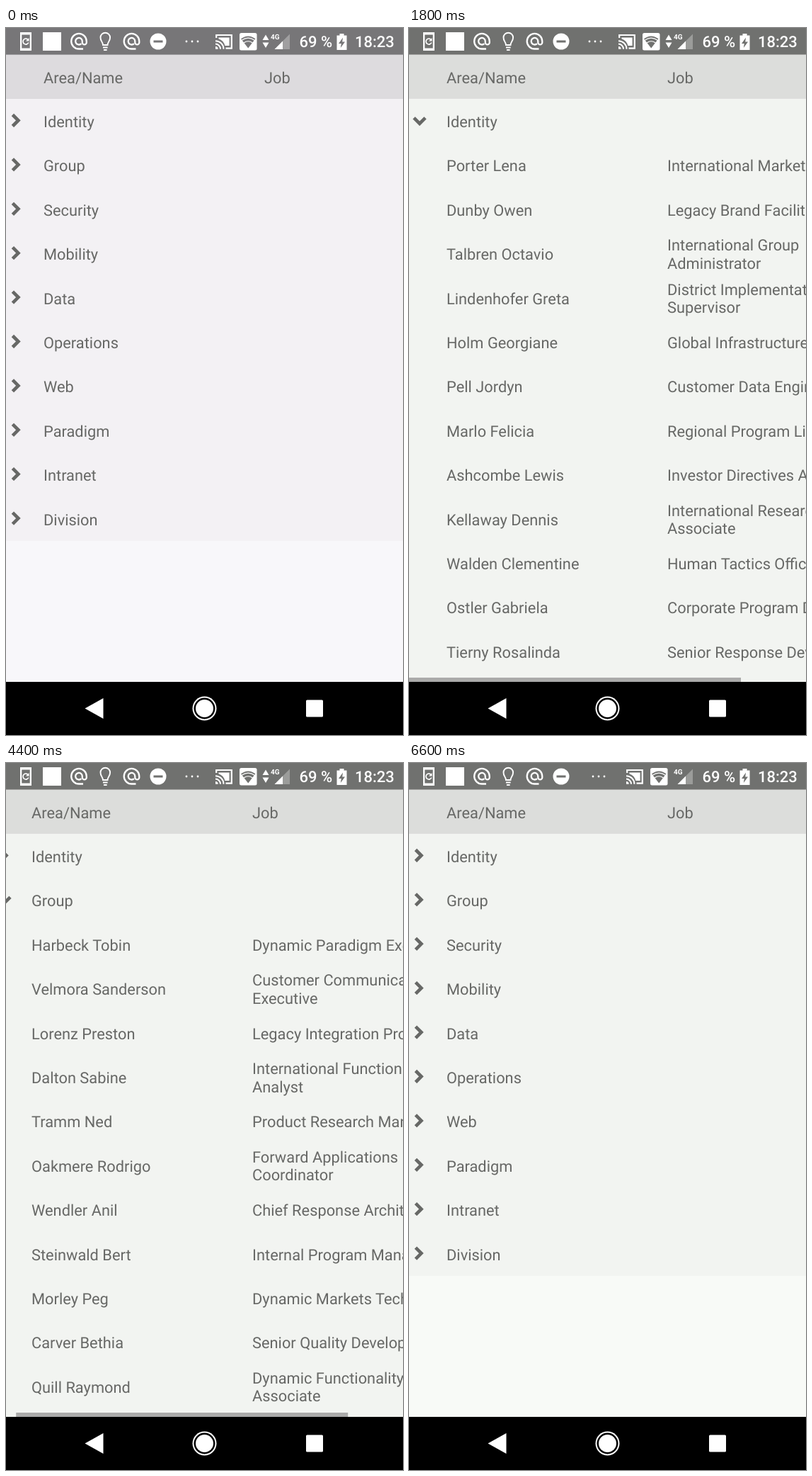
These frames come from a looping animation (561x998 px, 7300 ms). An HTML page with a canvas:

```html
<!DOCTYPE html>
<html lang="en">
<head>
<meta charset="utf-8">
<title>Grouped table</title>
<style>
html, body { margin: 0; width: 100%; height: 100%; overflow: hidden; background: #000; }
canvas { display: block; }
</style>
</head>
<body>
<canvas id="stage" width="561" height="998"></canvas>
<script>
const ctx = document.getElementById('stage').getContext('2d');
const LOOP = 7300, W = 561, ROW = 62.4, HEAD = 37.4, TOP = HEAD + ROW, BOTTOM = 923;
const FULL = 812.5, THUMB = 469, CONTENT = 671;
const INK = '#676866';

const areas = ['Identity', 'Group', 'Security', 'Mobility', 'Data', 'Operations',
  'Web', 'Paradigm', 'Intranet', 'Division'];

const people = [
  [
    ['Porter Lena', 'International Markets Agent'],
    ['Dunby Owen', 'Legacy Brand Facilitator'],
    ['Talbren Octavio', 'International Group|Administrator'],
    ['Lindenhofer Greta', 'District Implementation|Supervisor'],
    ['Holm Georgiane', 'Global Infrastructure Agent'],
    ['Pell Jordyn', 'Customer Data Engineer'],
    ['Marlo Felicia', 'Regional Program Liaison'],
    ['Ashcombe Lewis', 'Investor Directives Analyst'],
    ['Kellaway Dennis', 'International Research|Associate'],
    ['Walden Clementine', 'Human Tactics Officer'],
    ['Ostler Gabriela', 'Corporate Program Designer'],
    ['Tierny Rosalinda', 'Senior Response Developer']
  ],
  [
    ['Harbeck Tobin', 'Dynamic Paradigm Executive'],
    ['Velmora Sanderson', 'Customer Communications|Executive'],
    ['Lorenz Preston', 'Legacy Integration Producer'],
    ['Dalton Sabine', 'International Functionality|Analyst'],
    ['Tramm Ned', 'Product Research Manager'],
    ['Oakmere Rodrigo', 'Forward Applications|Coordinator'],
    ['Wendler Anil', 'Chief Response Architect'],
    ['Steinwald Bert', 'Internal Program Manager'],
    ['Morley Peg', 'Dynamic Markets Technician'],
    ['Carver Bethia', 'Senior Quality Developer'],
    ['Quill Raymond', 'Dynamic Functionality|Associate']
  ]
];

// Each toggle: when its row is tapped open, tapped closed, and when its scrollbar shows.
const toggles = [{ open: 500, close: 2400, bar: 1300 }, { open: 3600, close: 5700, bar: 4400 }];

const scrollKeys = [[1200, 0], [1300, 25], [1400, 85], [1500, 110], [1600, 110], [1700, 50], [1800, 0],
  [4300, 0], [4400, 17], [4500, 75], [4600, 110], [4700, 110], [4800, 100], [4900, 61], [5000, 18], [5100, 0]];

const swing = p => 0.5 - Math.cos(Math.PI * Math.min(1, Math.max(0, p))) / 2;

function scrollAt(t) {
  const i = scrollKeys.findIndex(k => k[0] >= t);
  if (i < 1) return 0;
  const [t0, a] = scrollKeys[i - 1], [t1, b] = scrollKeys[i];
  return a + (b - a) * (t - t0) / (t1 - t0);
}

const openness = (g, t) => swing((t - g.open) / 600) - swing((t - g.close - 100) / 600);
const pressed = (g, t) => t >= g.open && t < g.open + 600 || t >= g.close && t < g.close + 700;

function rect(color, x, y, w, h) {
  ctx.fillStyle = color;
  ctx.fillRect(x, y, w, h);
}

function label(str, x, y, color = INK, font = '21.84px') {
  ctx.fillStyle = color;
  ctx.font = font + ' Roboto, sans-serif';
  ctx.textRendering = 'geometricPrecision';
  ctx.fillText(str, x, y);
}

function fill(path, color = '#fff') {
  ctx.fillStyle = color;
  ctx.fill(new Path2D(path), 'evenodd');
}

function line(path, width, color = '#fff') {
  ctx.strokeStyle = color;
  ctx.lineWidth = width;
  ctx.stroke(new Path2D(path));
}

function disc(x, y, r, color = '#fff') {
  ctx.fillStyle = color;
  ctx.beginPath();
  ctx.arc(x, y, r, 0, 7);
  ctx.fill();
}

function box(x, y, w, h, r, color = '#fff') {
  ctx.fillStyle = color;
  ctx.beginPath();
  ctx.roundRect(x, y, w, h, r);
  ctx.fill();
}

function shifted(x, y, draw) {
  ctx.save();
  ctx.translate(x, y);
  draw();
  ctx.restore();
}

function chevron(y, turn) {
  shifted(14, y + 31.7, () => {
    ctx.rotate(turn * Math.PI / 2);
    line('M-4.6-9L3.4-1L-4.6 7', 4.7, INK);
  });
}

function person([name, job], y) {
  label(name, 53, y + 40.1);
  const lines = job.split('|');
  lines.forEach((s, i) => label(s, 365, y + 40.1 + 25.4 * (i - (lines.length - 1) / 2)));
}

function table(t, theme) {
  const x = scrollAt(t), open = toggles.map(g => openness(g, t));
  const extra = (open[0] + open[1]) * FULL;
  rect(theme.rest, 0, TOP, W, BOTTOM - TOP);
  rect(theme.row, 0, TOP, W, Math.min(BOTTOM - TOP, 10 * ROW + extra));

  let y = TOP;
  areas.forEach((area, i) => {
    const turn = open[i] || 0;
    if (toggles[i] && pressed(toggles[i], t)) rect('#ebecea', 0, y, W, ROW);
    shifted(-x, 0, () => {
      label(area, 53, y + 40.1);
      chevron(y, turn);
      y += ROW;
      if (!turn) return;
      ctx.beginPath();
      ctx.rect(0, y, CONTENT, turn * FULL);
      ctx.clip();
      people[i].forEach((p, k) => person(p, y + k * ROW));
      y += turn * FULL;
    });
  });

  if (toggles.some(g => t >= g.bar && t < g.close)) rect('#ababaa', x * W / CONTENT, 917, THUMB, 6);

  rect(theme.head, 0, HEAD, W, ROW);
  shifted(-x, 0, () => person(['Area/Name', 'Job'], HEAD));
}

function statusBar(t, bg) {
  const idle = t >= 6600;
  rect(bg, 0, 0, W, HEAD);

  fill('M20 6H36V32H20ZM22.3 9.5V28.5H33.7V9.5Z');
  line('M31.5 17A4 4 0 1 0 31.8 20.5', 1.6);
  fill('M32.5 14V18.5H28Z');
  rect('#fff', 52, 6, 26, 26);
  for (const x of [103, 177.5]) shifted(x, 18.7, () =>
    line('M6 10.8H0A10.8 10.8 0 1 1 10.8 0V1.7A3 3 0 0 1 4.8 1.7V0A4.8 4.8 0 1 0 3.4 3.4', 2.3));
  line('M137 24C137 20 133.5 18.5 133.5 13.5A6.8 6.8 0 0 1 147.1 13.5C147.1 18.5 143.5 20 143.5 24Z', 1.9);
  line('M137 27.5H143.6M138 31H142.6', 2);
  disc(215, 19, 11.5);
  rect(bg, 208.5, 17.5, 13, 3);

  for (const d of [-8, 0, 8]) disc((idle ? 268 : 263) + d, 19, 1.4);

  shifted(idle ? 11 : 0, 0, () => {
    line('M297.2 14V10H318.8V28.6H310.5', 2.2);
    line('M296 18.2A11.5 11.5 0 0 1 307.5 29.7M296 22.6A7 7 0 0 1 303 29.7', 2);
    fill('M296 26V29.7H299.7A3.7 3.7 0 0 0 296 26Z');
    fill('M300.4 13.4H315.6V25H309.4Q307.4 17.6 300.4 15.3Z');
    box(330, 7, 24.5, 24.5, 2.5);
    fill('M342.2 28.5L332 15.2Q342.2 7.6 352.4 15.2Z', bg);
    line('M333.2 17.3Q342.2 11 351.2 17.3M336 21Q342.2 16.5 348.4 21', 1.2);
  });
  if (!idle) fill('M362.5 17L367 9.5L371.5 17ZM362.5 20.5H371.5L367 28Z');

  label('4G', 374, 15.5, '#fff', '700 10px');
  fill('M401 8.5V30H379.5Z', 'rgba(255,255,255,.3)');
  fill('M391 18.5V30H379.5Z');
  label('69 %', 414.5, 27, '#fff', '500 22px');
  fill('M471.5 8H477.5V10.5H481.5V31H467.5V10.5H471.5Z');
  fill('M476 13.5L470 22H473.8L472.8 28L479 19.5H475.2Z', bg);
  label('18:23', 493, 27, '#fff', '500 22px');
}

function navBar() {
  rect('#000', 0, BOTTOM, W, 75);
  fill('M111.5 960.5L137.5 946V975Z');
  disc(280.5, 960.5, 17);
  disc(280.5, 960.5, 15, '#000');
  disc(280.5, 960.5, 12.5);
  box(424, 948.5, 24, 24, 1.5);
}

const early = { status: '#777678', head: '#dddbde', row: '#f3f1f4', rest: '#f8f7fa' };
const late = { status: '#70716f', head: '#dcdddb', row: '#f2f4f1', rest: '#f8faf7' };

function frame(now) {
  const t = Math.floor(now % LOOP / 100) * 100;
  const theme = t < 300 ? early : late;
  table(t, theme);
  statusBar(t, theme.status);
  navBar();
  requestAnimationFrame(frame);
}
frame(performance.now());
</script>
</body>
</html>
```
